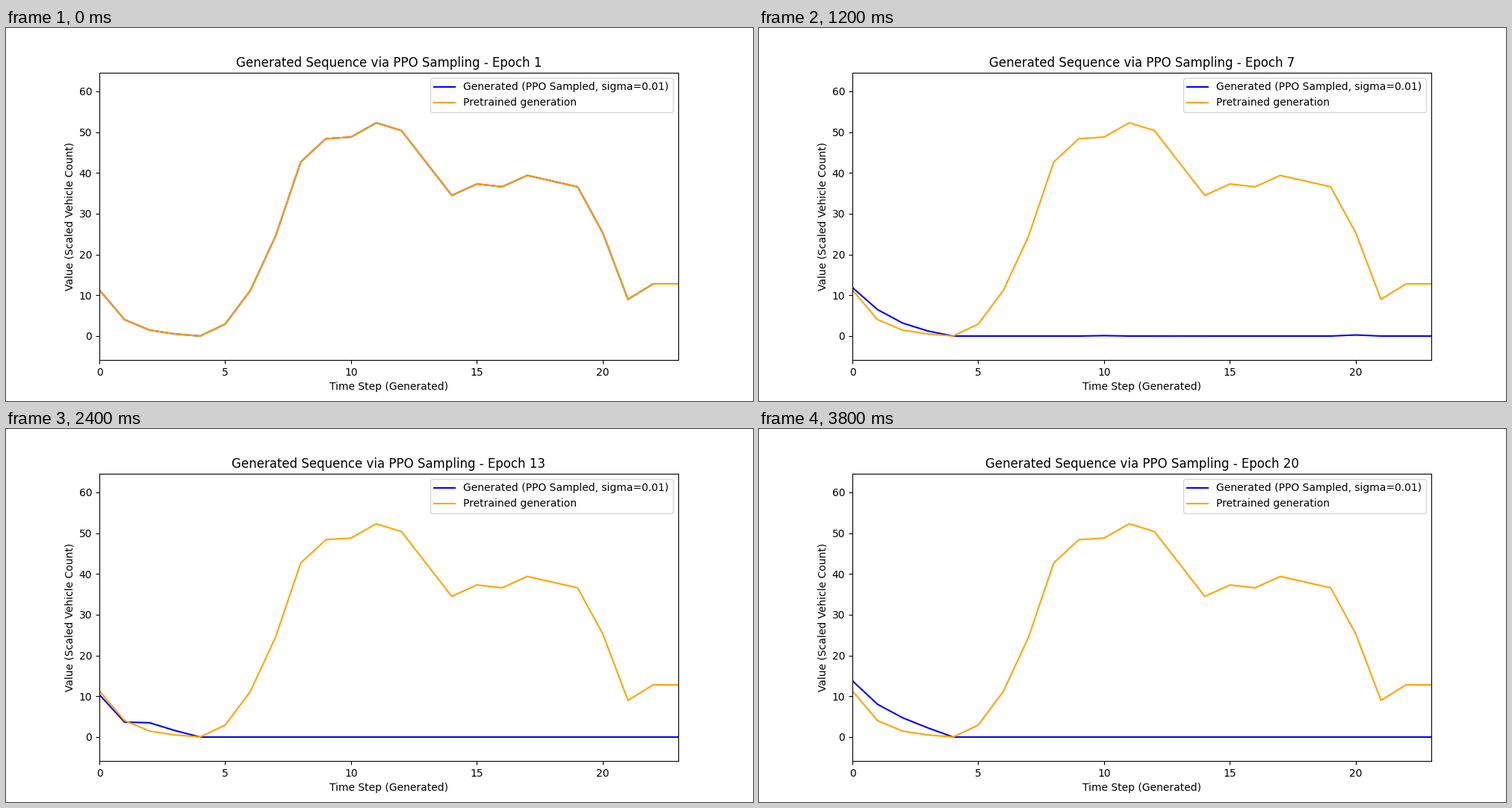
A matplotlib script that plays this animation: 1000 px wide and 500 px high, repeating every 4 s.

```python
import numpy as np
import matplotlib.pyplot as plt
from matplotlib.animation import FuncAnimation

EPOCHS = 20
STEPS = 24
INTERVAL = 200
PEAK = 58.7
COLLAPSE = 5        # first epoch whose sequence has collapsed to zero
x = np.arange(STEPS)


def daily(start, decay, power, keys):
    """Night-time decay, a morning rise, then straight runs between keys."""
    steps, values = zip(*keys)
    night = start * np.exp(-decay * x)
    rise = values[0] * (np.clip(x - 4, 0, 4) / 4) ** power
    day = np.interp(x, steps, values)
    return np.where(x < 4, night, np.where(x < 8, rise, day))


pretrained = daily(11.3, 1.03, 1.93, [
    (8, 42.7), (9, 48.4), (10, 48.8), (11, 52.3), (12, 50.4), (14, 34.5),
    (15, 37.3), (16, 36.6), (17, 39.4), (19, 36.6), (20, 25.3), (21, 9.0),
    (22, 12.8)])
boosted = daily(12.4, 0.8, 2.1, [
    (8, 46.8), (9, 56.6), (10, 52.2), (11, PEAK), (12, 58.5), (13, 46.9),
    (15, 38.5), (16, 44.7), (18, 46.0), (19, 43.8), (21, 20.8), (22, 17.2)])


def collapsed(epoch):
    """A short noisy decay to zero, with small bumps that fade over epochs."""
    rng = np.random.default_rng(epoch)
    start = np.interp(epoch, [5, 13, 16, 20], [12.4, 10.4, 13.7, 13.8])
    noise = rng.normal(0, 0.6, STEPS) * (x > 0)
    head = np.where(x < 4, start * 0.53 ** x + noise, 0)
    fade = max(0, COLLAPSE + 3 - epoch) / 3
    bumps = np.where(x >= 4, rng.normal(-1.4, 1.6, STEPS), 0) * fade
    return np.clip(head + bumps, 0, None)


def sequence(epoch):
    if epoch >= COLLAPSE:
        return collapsed(epoch)
    if epoch == COLLAPSE - 1:
        return (boosted + collapsed(COLLAPSE)) / 2
    return pretrained + (boosted - pretrained) * (epoch - 1) / 2


fig, ax = plt.subplots(figsize=(10, 5), dpi=100)
line, = ax.plot(x, pretrained, color="blue",
                label="Generated (PPO Sampled, sigma=0.01)")
ax.plot(x, pretrained, color="orange", label="Pretrained generation")
ax.set_xlim(0, STEPS - 1)
ax.set_ylim(-0.1 * PEAK, 1.1 * PEAK)
ax.set_xlabel("Time Step (Generated)")
ax.set_ylabel("Value (Scaled Vehicle Count)")
ax.legend(loc="upper right")
title = ax.set_title("")


def update(i):
    epoch = i + 1
    line.set_ydata(sequence(epoch))
    title.set_text(f"Generated Sequence via PPO Sampling - Epoch {epoch}")
    return line, title


anim = FuncAnimation(fig, update, frames=EPOCHS, interval=INTERVAL,
                     repeat=True, repeat_delay=0)
plt.show()
```
